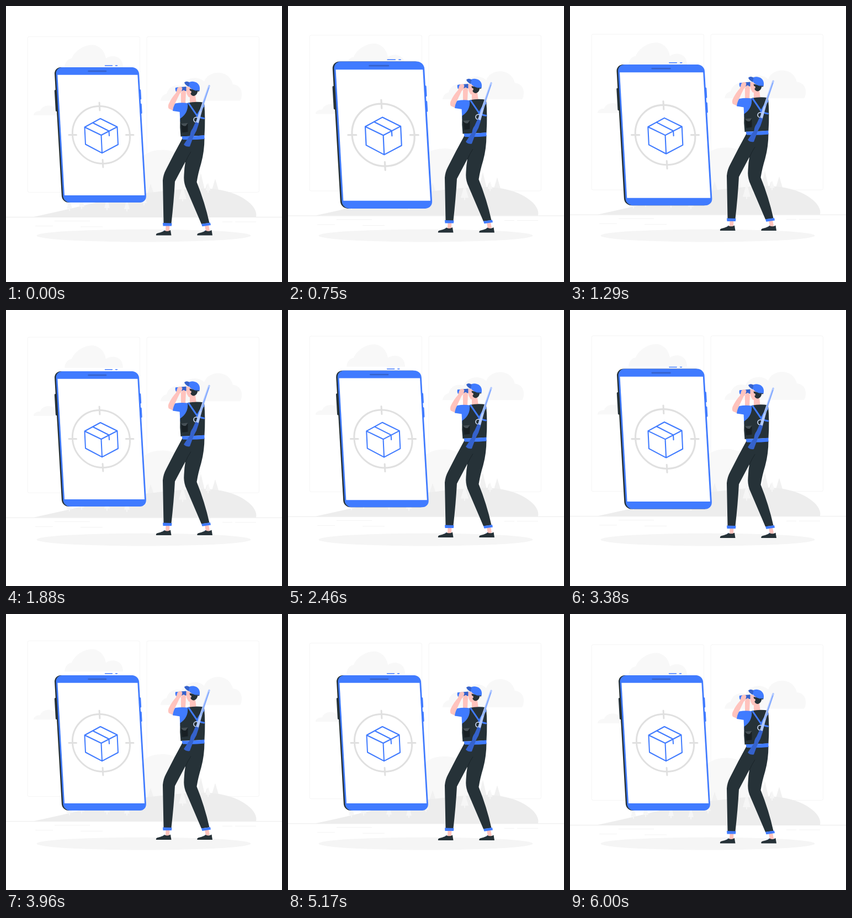
An HTML page that plays this animation: 500 px wide and 500 px high, repeating every 6.04 s.

```html
<!DOCTYPE html>
<html lang="en">
<head>
<meta charset="utf-8">
<title>Parcel tracking</title>
<style>
  html, body { margin: 0; width: 100%; height: 100%; overflow: hidden; background: #fff; }
  svg { display: block; width: 100%; height: 100%; }
  .blue { fill: #407bff; }
  .deep { fill: #3562cc; }
  .dark { fill: #263238; }
  .skin { fill: #ffc3bd; }
  .line { fill: none; stroke: #407bff; stroke-linecap: round; stroke-linejoin: round; }
</style>
</head>
<body>
<svg viewBox="0 0 500 500">
  <g id="scenery">
    <g fill="none" stroke="#f5f5f5">
      <rect x="39" y="55.5" width="203.5" height="282" rx="3"/>
      <rect x="255" y="55.5" width="203.5" height="282" rx="3"/>
    </g>
    <g fill="#f8f8f8">
      <path d="M106 111C107 101 112 96 119 95C124 82 140 71 155 70.500C168 70 179 81 181 95C192 87 212 90 212 111Z"/>
      <path d="M50 198C50 193 55 190 62 190C65 180 80 177 88 184L110 198Z"/>
      <path d="M280 171.500C281 164 286 160 291 159C294 147 306 141 318 145C324 130 347 125 359 137C366 116 404 113 411 142C421 142 428 151 427 161C427 166 425 171 424 171.500Z"/>
      <path d="M210 350C222 305 238 270 265 263C290 257 316 263 330 285Q344 305 348 350Z"/>
    </g>
    <path id="backTrees" fill="#f1f1f1"/>
    <path fill="#ededed" d="M50 382Q101 371 140 361.500Q220 342 270 337Q318 330.500 358 330.500C393 331 421 340 438 354C450 363 455 374 453 382Z"/>
    <path id="hillTrees" fill="#f6f6f6"/>
    <path stroke="#ebebeb" fill="none" d="M0 382.500H500"/>
    <path stroke="#f3f3f3" fill="none" d="M88 389.500H152M53 398.500H85M135 400H175M392 391H410M415 391H453"/>
  </g>

  <ellipse cx="249.500" cy="416" rx="194" ry="11.500" fill="#f5f5f5"/>

  <g id="phone">
    <path class="line" stroke-width="1.400" d="M179.500 108H192.500M198.500 108H201.500"/>
    <g transform="matrix(1 0 .058 1 -13.572 0)">
      <rect class="dark" x="92.500" y="152" width="6" height="39" rx="1.500"/>
      <rect class="dark" x="94.500" y="111" width="150" height="245" rx="12"/>
      <rect class="blue" x="243" y="151" width="6" height="18.500" rx="1.500"/>
      <rect class="blue" x="243" y="176.500" width="6" height="18.500" rx="1.500"/>
      <rect class="blue" x="97" y="111" width="150.500" height="245" rx="12"/>
      <rect x="99.700" y="124.700" width="145" height="218.300" fill="#fff"/>
      <rect class="deep" x="155" y="116.800" width="34" height="2.500" rx="1.200"/>
      <g fill="none" stroke="#e0e0e0" stroke-width="3" stroke-linecap="round">
        <circle cx="172.500" cy="233.500" r="52"/>
        <path d="M172.500 175V189M172.500 278.500V292M114 233.500H127.500M217.500 233.500H231"/>
      </g>
    </g>
    <path class="line" stroke-width="2" d="M171 204L201.500 219L203 251L174 266.300L144 250.500L142.500 219.500ZM142.500 219.500L172.500 234L201.500 219M172.500 234L174 266.300M157 211.500L186.500 226.500L187 235"/>
  </g>

  <g id="hunter">
    <g id="footwear">
      <path class="skin" d="M289.500 396H296.500L296 408L289 409ZM360 397L367 396L369 407L362 409Z"/>
      <g id="shoe">
        <path class="dark" d="M272 415.500C271 412 275 411.300 279 410.500Q284 409 287 406.500Q292 409.500 298 406L299.500 415.500Z"/>
        <path fill="none" stroke="#c6d7ff" d="M283.500 408.500L287.500 405.500"/>
      </g>
      <use href="#shoe" x="74.500"/>
    </g>
    <path class="dark" d="M320 239H359.500Q359.500 263 353.500 285Q348 303 345.500 319Q360 355 368.500 393L354 395L325 327Q321.500 317 322.500 306Q323 293 325 282L306 318Q304 354 299.500 394H285.500L284 316Q285 305 290 296Q305 266 320 239Z"/>
    <path fill="none" stroke="#1a2429" d="M335 264Q329 273 325 283"/>
    <path class="blue" d="M284 393L300.500 393.500L300 398.500H284.500ZM354 394.800L370 392.500L371 397L355.500 399.300Z"/>

    <path class="skin" d="M317 157Q322 153 326 156L325 178H317Z"/>
    <path class="skin" d="M333 159L343 162L345 176H333Z"/>
    <path class="skin" d="M326.500 146L337 148L338 160Q335 167.500 330.500 164.500Q327 160 326.500 155L325 154Z"/>
    <path class="dark" d="M332.500 150L347 152.500C348 158 344 162.500 339.500 163Q334.500 162 334 157Z"/>
    <circle class="skin" cx="333.500" cy="156" r="2.400"/>
    <path class="blue" d="M328.500 141Q333 136 340 137C348 138 353 145 350.500 154Q345 155 340 152Q333 150 328.500 141Z"/>
    <path class="deep" d="M323 138.500Q327 135 332.500 138.300L331 146.500Q324 142.500 323 138.500Z"/>
    <path class="dark" d="M341 152.500L350.500 153.500L349 155Z"/>

    <path class="blue" d="M314 180L334 176L331 194L315.500 210Z"/>
    <path class="dark" d="M329 175.500Q345 172.500 359 175Q361.500 204 359.500 234.500L316.500 236.500Q314.500 220 315.500 204Q331 194 329 175.500Z"/>
    <path class="blue" d="M318.500 236Q340 236.500 359.500 234V241Q340 243 320 242Z"/>
    <path class="line" stroke-width="3" stroke-linecap="butt" d="M331 176.500L345 197Q350 202.500 358.500 203.500M358 181Q351 189 346 200"/>
    <path fill="#182024" d="M317 213H329.500V228L319 229.500Z"/>
    <path fill="#465056" d="M317 213L329.500 212L326 217Q321 219 317 213Z"/>

    <path class="deep" d="M307 148L316 147L326.500 146V154L316 154.500L308 155Q306 151 307 148Z"/>
    <path class="blue" d="M307 148L312 147.500V155L308 155Q306 151 307 148Z"/>
    <path class="skin" d="M304 190L295 186Q293 183 294.500 178Q300 166 308 157.500L310.500 149Q313 145.500 317.500 146.500L319.500 149L318 155.500L314.500 159L306 177Z"/>
    <path class="skin" d="M318.500 156Q319 152 323 152.500L326 157L322 160Z"/>
    <path class="blue" d="M306.500 176.500Q318 174.500 329 176Q330.500 188 322 193L302 190Q303 182 306.500 176.500Z"/>

    <circle cx="344.500" cy="206" r="4.500" fill="none" stroke="#d9e5ff" stroke-width="1.500"/>
    <path fill="#b3caff" d="M366.500 144Q368.500 141.500 370 144.500L356 187L348.500 214L343.500 212L352.500 184Z"/>
    <path class="line" stroke-width=".7" stroke="#407bff" d="M367.500 148L353 190"/>
    <path class="deep" d="M343.500 210L349.500 212.500L345 226Q342 231 339.500 237L333 254.500Q327 256 322 251L333.500 234Q334 227 338 222Z"/>
  </g>
</svg>
<script>
  const LOOP = 6040, CYCLE = 6000, LIFT = 10;
  const byId = id => document.getElementById(id);

  // Each tree is [x, base, height, width], with a short trunk.
  const tree = ([x, y, h, w]) =>
    `M${x} ${y - h}L${x + w / 2} ${y}H${x + 1}V${y + 4}H${x - 1}V${y}H${x - w / 2}Z`;
  const plant = (id, trees) => byId(id).setAttribute("d", trees.map(tree).join(""));
  plant("backTrees", [[353, 341, 38, 18], [364, 342, 20, 13], [379, 338, 25, 15], [262, 339, 17, 11]]);
  plant("hillTrees", [[320, 350, 25, 14], [337, 343, 24, 13], [366, 334, 14, 9], [115, 367, 17, 10],
    [137, 364, 17, 10], [183, 366, 18, 10], [219, 368, 18, 10], [250, 357, 17, 10]]);

  const rise = (t, period) => -LIFT * (1 - Math.abs(2 * (t % period) / period - 1));

  const beats = [[0, 1], [.1, 1.1], [.3, 1], [.4, 1], [.5, 1.1], [.6, 1], [1, 1]];
  function pulse(p) {
    const i = Math.max(1, beats.findIndex(([at]) => at >= p));
    const [a, from] = beats[i - 1], [b, to] = beats[i];
    return from + (to - from) * (p - a) / (b - a);
  }

  const start = performance.now();
  function draw() {
    const t = Math.min((performance.now() - start) % LOOP, CYCLE);
    const move = (id, y) => byId(id).setAttribute("transform", `translate(0 ${y})`);
    move("scenery", rise(t, CYCLE));
    move("hunter", rise(t, CYCLE / 2));
    byId("phone").setAttribute("transform",
      `translate(171.5 231.5) scale(${pulse(t / CYCLE)}) translate(-171.5 -231.5)`);
    requestAnimationFrame(draw);
  }
  draw();
</script>
</body>
</html>
```
